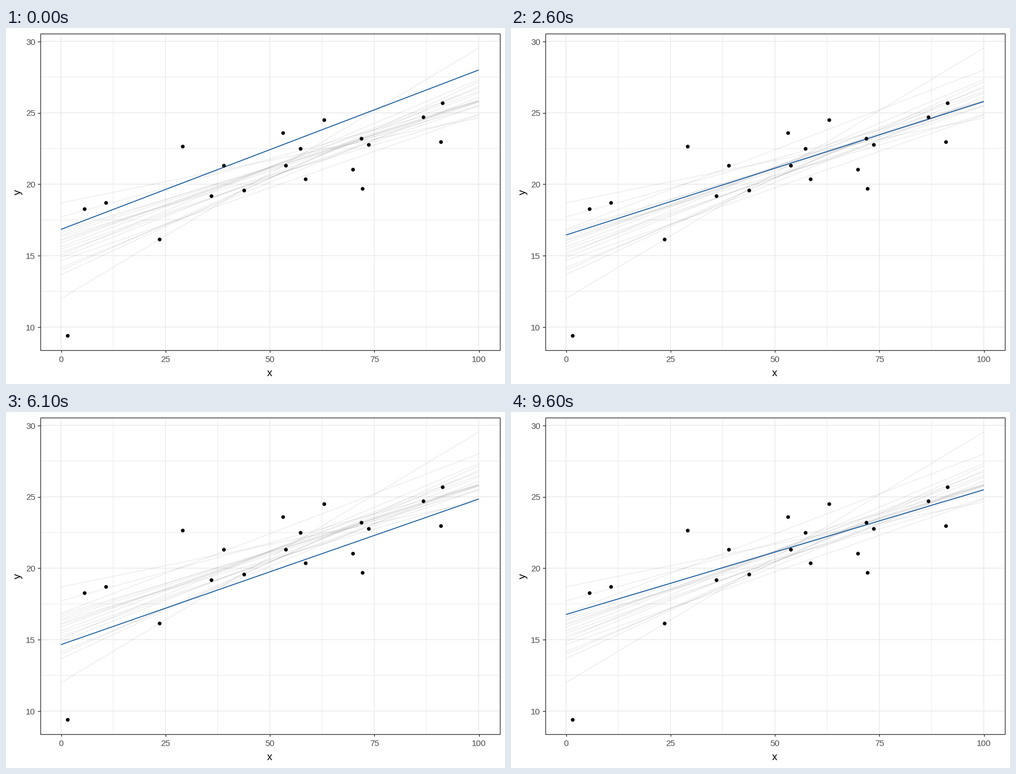
Recreate the animation shown at these times as a matplotlib script. Size 885 by 632 pixels, loop 10000 ms.

```python
import matplotlib.pyplot as plt
from matplotlib.animation import FuncAnimation
from matplotlib.patches import Rectangle

WIDTH, HEIGHT, DPI = 885, 632, 100
PX = 72 / DPI  # points per pixel
LEFT, RIGHT, TOP, BOTTOM = 60, 875, 9.6, 571.4
X0, X100 = 97, 838
BLUE, DARK, GRID = "#08519c", "#333333", "#ebebeb"

# Height of each fitted line, in pixels, at x = 0 and x = 100
FITS = [
    (357, 74), (407, 115), (480, 35), (425, 122), (429.5, 103),
    (367, 130), (402, 91), (392, 137.5), (310, 159), (437.5, 95),
    (335, 129), (370, 153), (412.5, 154), (375, 127), (388, 106),
    (377, 130), (363, 129), (381, 112), (398, 131), (359, 137.5),
]
POINTS = [
    (108, 545.5), (138, 320.5), (176.5, 309.5), (271, 374.5), (312, 209),
    (363.5, 297), (385, 243.5), (421.5, 287.5), (490.5, 185), (495, 243.5),
    (521.5, 213), (530.5, 267.5), (563, 162), (614.5, 250), (629.5, 195.5),
    (631.5, 284.5), (642.5, 206), (739, 157), (770.5, 201.5), (773, 132),
]

plt.rcParams["font.family"] = "Liberation Sans"
fig = plt.figure(figsize=(WIDTH / DPI, HEIGHT / DPI), dpi=DPI, facecolor="white")
ax = fig.add_axes([0, 0, 1, 1])
ax.set_xlim(-0.5, WIDTH - 0.5)
ax.set_ylim(HEIGHT - 0.5, -0.5)
ax.axis("off")


def x_pixel(value):
    return X0 + (X100 - X0) * value / 100


def y_pixel(value):
    return 23.2 + (30 - value) * 25.36


def stroke(xs, ys, color, width, **style):
    style.setdefault("solid_capstyle", "butt")
    return ax.plot(xs, ys, color=color, lw=width * PX, **style)[0]


def label(x, y, text, size, color, **style):
    ax.text(x, y, text, fontsize=size * PX, color=color, va="baseline", **style)


def draw_grid():
    for step in range(9):
        x = x_pixel(12.5 * step)
        width = 1 if step % 2 else 1.5
        stroke([x, x], [TOP, BOTTOM], GRID, width, snap=False, zorder=1)
    for step in range(9):
        y = y_pixel(10 + 2.5 * step)
        width = 1 if step % 2 else 1.5
        stroke([LEFT, RIGHT], [y, y], GRID, width, snap=False, zorder=1)


def draw_axes():
    ax.add_patch(Rectangle((LEFT, TOP), RIGHT - LEFT, BOTTOM - TOP, fill=False,
                           ec=DARK, lw=1.3 * PX, zorder=6))
    for value in range(0, 101, 25):
        x = x_pixel(value)
        stroke([x, x], [BOTTOM, BOTTOM + 4.5], DARK, 1.3, zorder=6)
        label(x, 592.5, str(value), 15.3, "#4d4d4d", ha="center")
    for value in range(10, 31, 5):
        y = y_pixel(value)
        stroke([LEFT - 4.5, LEFT], [y, y], DARK, 1.3, zorder=6)
        label(51.5, y + 6, str(value), 15.3, "#4d4d4d", ha="right")
    label(467, 617.8, "x", 18.7, "black", ha="center")
    label(25, 290.5, "y", 18.7, "black", ha="center",
          rotation=90, rotation_mode="anchor")


draw_grid()
draw_axes()
for fit in FITS:
    stroke([X0, X100], fit, "black", 1.4, alpha=0.075, zorder=2)
current = stroke([X0, X100], FITS[0], BLUE, 1.5, zorder=3)
ax.plot(*zip(*POINTS), "o", color="black", ms=6.6 * PX, mew=0, zorder=4)


def update(tick):
    current.set_ydata(FITS[max(0, (tick - 1) // 5)])
    return [current]


anim = FuncAnimation(fig, update, frames=100, interval=100,
                     repeat=True, repeat_delay=0)
plt.show()
```
